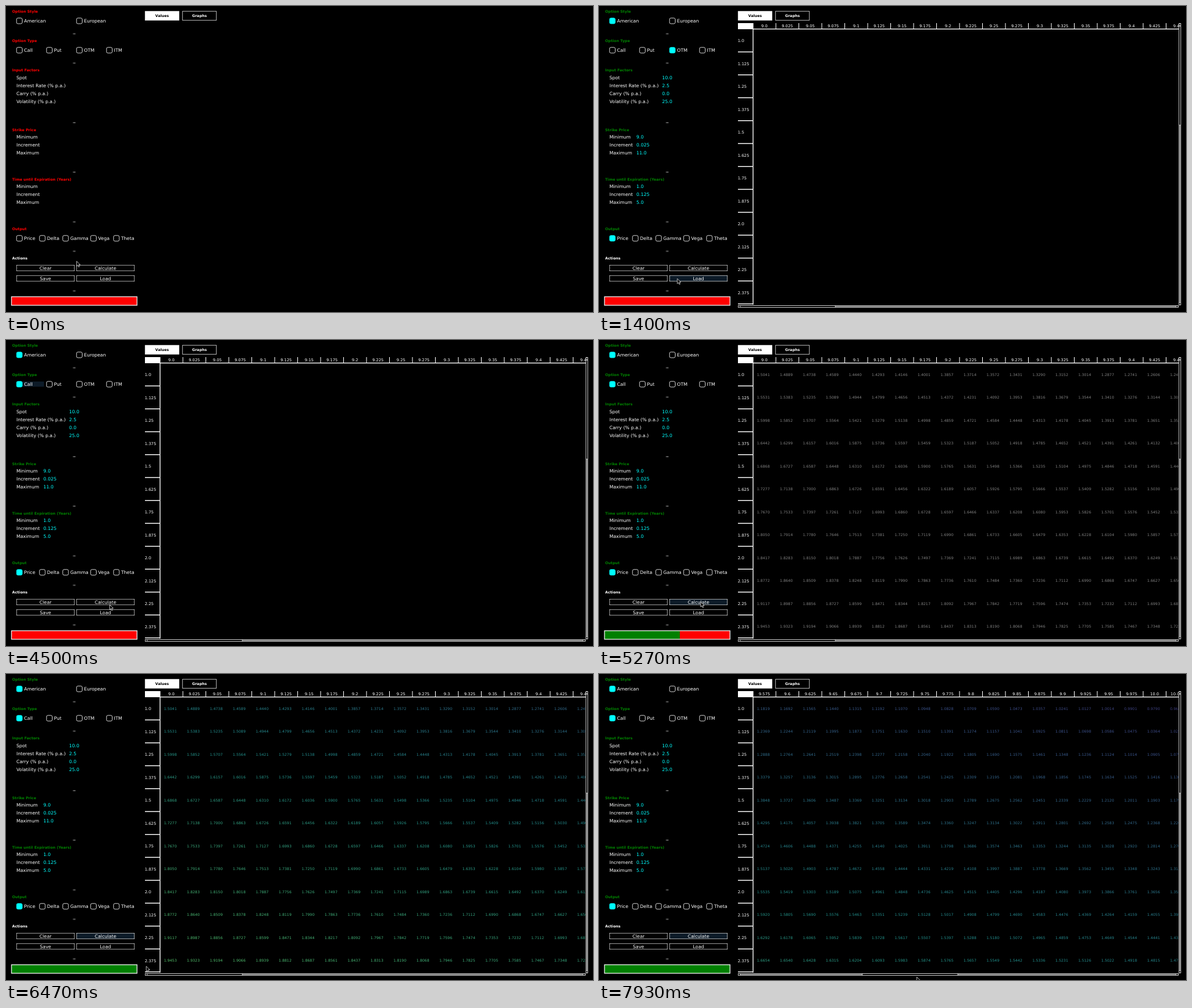
An HTML page with a canvas for the animation above (8 s loop, 959 by 501 pixels).

```html
<!DOCTYPE html>
<html lang="en">
<head>
<meta charset="utf-8">
<title>Option calculator</title>
<style>
html, body { margin: 0; width: 100%; height: 100%; overflow: hidden; background: #000; }
canvas { display: block; }
</style>
</head>
<body>
<canvas id="stage" width="959" height="501"></canvas>
<script>
const ctx = document.getElementById('stage').getContext('2d');
const LOOP = 8000, CELL = 37.5, LEFT = 252, TOP = 37.5, RIGHT = 947;
const CYAN = '#00ffff', GREEN = '#008000', FOCUS = '#0d1b28', GRAY = '#808080', EDGE = '#ddd';

// Moments at which the interface changes state
const LOADED = 1400, CALL_HOVER = 3070, CALL_CLICK = 3530, CALCULATE = 4930, COLOURED = 5870;

// Pointer moves: start, end, steps, bend and target of the curve
const MOVES = [
  [230, 730, 15, [121, 432], [127.5, 446]],
  [2000, CALL_HOVER, 7, [200, 330], [19, 72.3]],
  [4000, 4500, 4, [110, 330], [169, 433]],
  [CALCULATE, 5100, 2, [167, 431], [165.7, 428.3]],
  [6270, 7130, 6, [215, 490], [291, 491]]
];

// Progress from 0 to 1 in equal jumps, the first at start and the last at end
function stepped(t, start, end, steps) {
  if (t < start) return 0;
  return Math.min(1, (Math.floor((t - start) / (end - start) * (steps - 1) + 1e-6) + 1) / steps);
}

const calculated = t => stepped(t, CALCULATE, 5600, 5);
const scrolled = t => Math.round(23 * stepped(t, 7400, 7930, 4) ** 2.26);

function text(str, x, y, color = '#fff', size = 7.5, align = 'left', weight = '') {
  ctx.save();
  ctx.translate(x, Math.round((y + size * .365) * 2) / 2);
  ctx.scale(.5, .5);
  ctx.font = `${weight} ${size * 2}px "DejaVu Sans", sans-serif`;
  ctx.textRendering = 'geometricPrecision';
  ctx.textAlign = align;
  ctx.fillStyle = color;
  ctx.fillText(str, 0, 0);
  ctx.restore();
}

function rect(x, y, w, h, fill, stroke, line = 1) {
  if (fill) { ctx.fillStyle = fill; ctx.fillRect(x, y, w, h); }
  if (stroke) { ctx.strokeStyle = stroke; ctx.lineWidth = line; ctx.strokeRect(x, y, w, h); }
}

function checkbox(label, x, y, checked, hover) {
  ctx.beginPath();
  ctx.roundRect(x - 4.25, y - 4.75, 9.25, 9.25, 2.2);
  if (checked) { ctx.fillStyle = CYAN; ctx.fill(); }
  ctx.strokeStyle = checked || hover ? CYAN : '#fff';
  ctx.lineWidth = .8;
  ctx.stroke();
  text(label, x + 8, y);
}

function button(label, x, y, focused) {
  rect(x + .25, y - 4.75, 94.5, 9.5, focused ? FOCUS : null, '#fff', .6);
  text(label, x + 47.5, y, '#fff', 7.5, 'center');
}

function tab(label, x, active) {
  rect(x + .25, 8.75, 55.5, 14.5, active ? '#fff' : null, '#fff', .7);
  text(label, x + 28, 16, active ? '#000' : '#fff', 6, 'center', 'bold');
}

function splitter(y) {
  for (let i = -1; i <= 1; i++) rect(111.1 + i * 1.5, y - 1, .8, 2, '#999');
}

function section(title, y, color) {
  splitter(y - 11.5);
  text(title, 10, y - .3, color, 6, 'left', 'bold');
}

function fields(entries, x, y, loaded) {
  Object.entries(entries).forEach(([label, value], i) => {
    text(label, 17, y + i * 13);
    if (loaded) text(value, x, y + i * 13, CYAN);
  });
}

function drawForm(t) {
  const loaded = t >= LOADED, called = t >= CALL_CLICK, calculating = t >= CALCULATE;
  const status = loaded ? GREEN : '#f00';

  section('Option Style', 8.5, status);
  checkbox('American', 21.5, 24.5, loaded);
  checkbox('European', 119.5, 24.5);

  section('Option Type', 57, status);
  if (called && !calculating) rect(17, 68, 45, 8.5, FOCUS);
  checkbox('Call', 21.5, 72.5, called, t >= CALL_HOVER);
  checkbox('Put', 70.5, 72.5);
  checkbox('OTM', 119.5, 72.5, loaded && !called);
  checkbox('ITM', 168.5, 72.5);

  section('Input Factors', 105, status);
  fields({ 'Spot': '10.0', 'Interest Rate (% p.a.)': '2.5', 'Carry (% p.a.)': '0.0',
    'Volatility (% p.a.)': '25.0' }, 103, 116.75, loaded);
  section('Strike Price', 202.5, status);
  fields({ Minimum: '9.0', Increment: '0.025', Maximum: '11.0' }, 61, 214.3, loaded);
  section('Time until Expiration (Years)', 283.5, status);
  fields({ Minimum: '1.0', Increment: '0.125', Maximum: '5.0' }, 61, 295.3, loaded);

  section('Output', 365, status);
  checkbox('Price', 21.5, 380.5, loaded);
  checkbox('Delta', 59, 380.5);
  checkbox('Gamma', 97, 380.5);
  checkbox('Vega', 142.5, 380.5);
  checkbox('Theta', 180, 380.5);

  section('Actions', 413, '#fff');
  button('Clear', 17, 429);
  button('Calculate', 115, 429, calculating);
  button('Save', 17, 446);
  button('Load', 115, 446, loaded && !called);

  splitter(466.5);
  rect(9, 476, 205, 14, '#f00');
  rect(9, 476, 205 * calculated(t), 14, GREEN);
  rect(9, 476, 205, 14, null, '#fff', 1.2);

  tab('Values', 227, true);
  tab('Graphs', 288, false);
}

// Normal distribution function, Abramowitz & Stegun 26.2.17
function cdf(x) {
  const k = 1 / (1 + .2316419 * Math.abs(x));
  const tail = Math.exp(-x * x / 2) / Math.sqrt(2 * Math.PI) * k *
    (.31938153 + k * (-.356563782 + k * (1.781477937 + k * (-1.821255978 + k * 1.330274429))));
  return x > 0 ? 1 - tail : tail;
}

// Black 76 call with a fitted early-exercise premium
function price(strike, years) {
  const spot = 10, gap = spot - strike;
  const dev = .25 * Math.sqrt(years), u = Math.sqrt(years) - 1;
  const d = Math.log(spot / strike) / dev + dev / 2;
  const european = Math.exp(-.025 * years) * (spot * cdf(d) - strike * cdf(d - dev));
  const rate = .00907 + .0062 * u - .0005 * u * u - .00032 * gap * (1 - gap);
  return european * (1 + years * rate + .0007 * gap);
}

function viridis(value) {
  const stops = [[68, 1, 84], [59, 82, 139], [33, 145, 140], [94, 201, 98], [253, 231, 37]];
  const p = Math.min(.999, Math.max(0, (value - .609) / 1.9)) * 4, i = Math.floor(p);
  return `rgb(${stops[i].map((c, n) => Math.round(c + (stops[i + 1][n] - c) * (p - i)))})`;
}

function decimal(value) {
  const n = +value.toFixed(3);
  return Number.isInteger(n) ? n.toFixed(1) : String(n);
}

function drawTable(t) {
  const first = scrolled(t), rowsDone = calculated(t) * 33;

  ctx.save();
  ctx.beginPath();
  ctx.rect(226, 28, RIGHT - 226, 462);
  ctx.clip();
  for (let col = 0; col < 19; col++) {
    const strike = 9 + .025 * (first + col), x = LEFT + CELL * col + 18.2;
    text(decimal(strike), x, 32.5, '#fff', 6.5, 'center');
    rect(LEFT + CELL * (col + 1) - 1, 28, 1, 9, '#fff');
    for (let row = 0; row < 12 && row < rowsDone; row++) {
      const value = price(strike, 1 + row / 8);
      text(value.toFixed(4), x - 1.7, 56.3 + CELL * row,
        t >= COLOURED ? viridis(value) : GRAY, 6, 'center');
    }
  }
  for (let row = 0; row < 12; row++) {
    text(decimal(1 + row / 8), 226.7, 56.4 + CELL * row, '#fff', 6.5);
    rect(227, TOP + CELL * (row + 1) - .5, 25, 1.4, '#fff');
  }
  rect(227, 28, 25, 10, '#fff');
  rect(251, 28, 1.3, 461, '#fff');
  rect(251, 37, RIGHT - 251, 1.3, '#fff');
  ctx.restore();

  // Scroll bars: grey trough, black thumb, square ends
  rect(227.5, 490.5, 719, 3, GRAY, EDGE, .7);
  rect(230 + 8.7 * first, 490.5, 156, 3, '#000', EDGE, .8);
  rect(947.5, 28.5, 3, 461, GRAY, EDGE, .7);
  rect(947.5, 33, 3, 162, '#000', EDGE, .8);
  for (const [x, y] of [[227.5, 490.5], [943, 490.5], [947.5, 29], [947.5, 486]])
    rect(x, y, 3, 3, '#000', EDGE, .7);
}

function drawPointer(t) {
  let pos = [115, 417.5];
  for (const [start, end, steps, bend, target] of MOVES) {
    const p = 1 - (1 - stepped(t, start, end, steps)) ** 2;
    pos = pos.map((v, i) => (1 - p) ** 2 * v + 2 * p * (1 - p) * bend[i] + p * p * target[i]);
  }
  const dragged = scrolled(t);
  ctx.save();
  ctx.translate(pos[0] + 9.9 * dragged, pos[1] + .2 * dragged);
  ctx.beginPath();
  [[.4, .4], [.4, 8.6], [2.3, 6.9], [3.7, 9.8], [5, 9.2], [3.7, 6.3], [6.3, 6.2]]
    .forEach(p => ctx.lineTo(...p));
  ctx.closePath();
  ctx.fillStyle = '#000';
  ctx.fill();
  ctx.strokeStyle = '#fff';
  ctx.lineWidth = .7;
  ctx.stroke();
  ctx.restore();
}

function draw(now) {
  const t = now % LOOP;
  rect(0, 0, 959, 501, '#000');
  drawForm(t);
  if (t >= LOADED) drawTable(t);
  drawPointer(t);
  requestAnimationFrame(draw);
}
requestAnimationFrame(draw);
</script>
</body>
</html>
```
